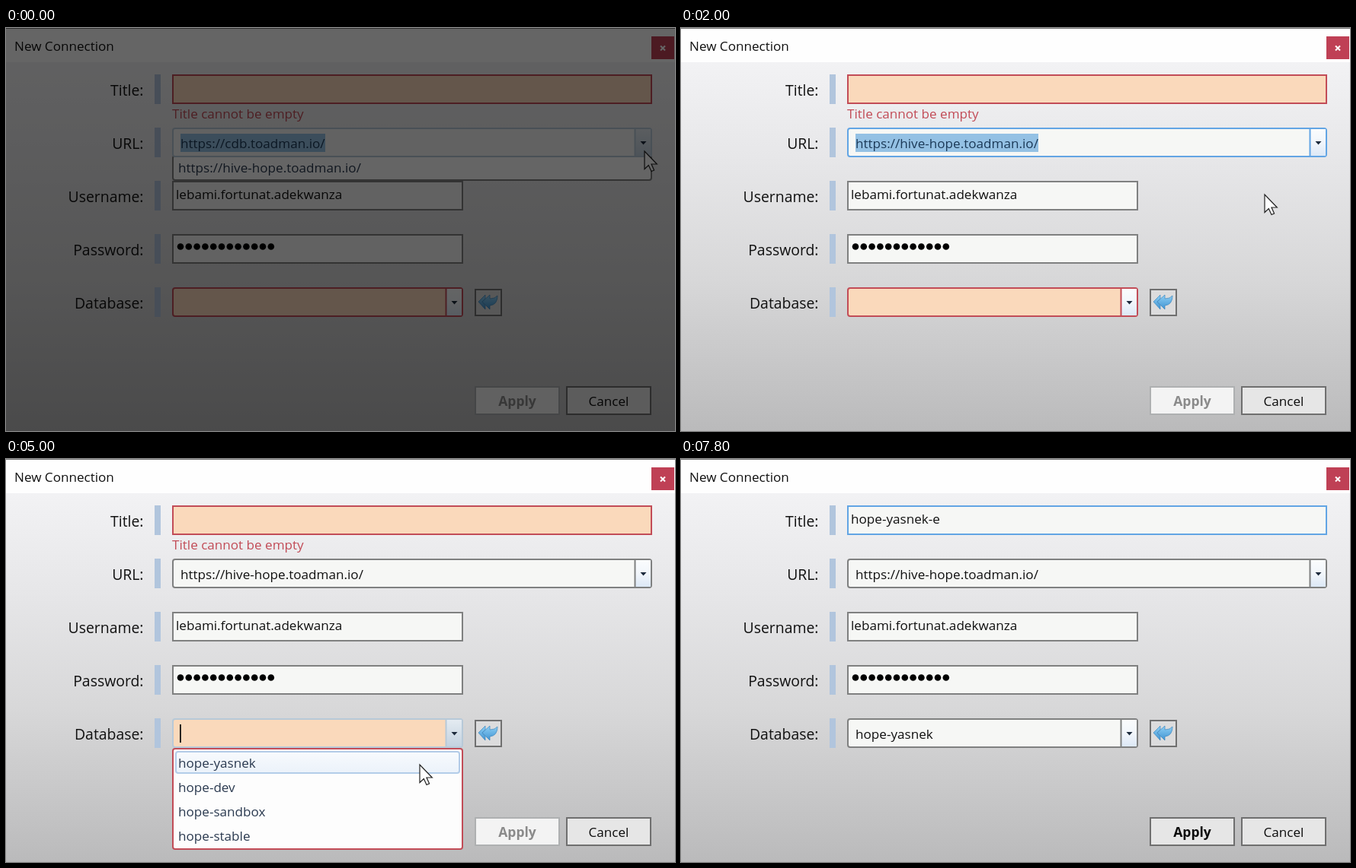
An HTML page that plays this animation: 878 px wide and 530 px high, repeating every 8000 ms.

```html
<!DOCTYPE html>
<html lang="en">
<head>
<meta charset="utf-8">
<title>New Connection</title>
<style>
html, body { margin: 0; width: 100%; height: 100%; overflow: hidden; }
svg { display: block; width: 878px; height: 530px; font: 17.1px "Open Sans", "Noto Sans", sans-serif; }
.label { font-size: 19.4px; text-anchor: end; }
.mid { text-anchor: middle; }
.bold { font-weight: 700; font-size: 17.5px; }
</style>
</head>
<body>
<svg viewBox="0 0 878 530">
  <defs>
    <linearGradient id="back" x2="0" y2="1">
      <stop stop-color="#f6f6f8"/><stop offset=".32" stop-color="#e7e7e9"/>
      <stop offset=".63" stop-color="#d7d7d8"/><stop offset="1" stop-color="#bababb"/>
    </linearGradient>
    <linearGradient id="drop" x2="0" y2="1">
      <stop stop-color="#fafcfd"/><stop offset=".5" stop-color="#f2f6fb"/><stop offset="1" stop-color="#dce8f6"/>
    </linearGradient>
    <linearGradient id="dropHot" x2="0" y2="1">
      <stop stop-color="#e4ebf1"/><stop offset="1" stop-color="#c3d2e0"/>
    </linearGradient>
    <linearGradient id="hover" x2="0" y2="1">
      <stop stop-color="#f8fafd"/><stop offset="1" stop-color="#ebf2fa"/>
    </linearGradient>
    <linearGradient id="arrow" x2="0" y2="1">
      <stop stop-color="#8fd0f5"/><stop offset="1" stop-color="#3f93d2"/>
    </linearGradient>
  </defs>
  <g id="stage"></g>
</svg>
<script>
const LOOP = 8000, STEP = 200;
const GRAY = "#7f8080", RED = "#c24c57", BLUE = "#62a5e4", PALE = "#b7c9d8";
const PAPER = "#f6f7f5", PEACH = "#fad9bb", NAVY = "#2b3a50";
const HOST = "https://hive-hope.toadman.io/", DB = "hope-yasnek";
const ITEMS = [DB, "hope-dev", "hope-sandbox", "hope-stable"];
const LABELS = ["Title:", "URL:", "Username:", "Password:", "Database:"];

// Pointer path: time, x, y
const PATH = [
  [200, 838, 162], [1000, 782, 184], [1400, 772, 188], [2000, 766, 219], [2400, 766, 219],
  [3200, 585, 363], [3600, 585, 363], [4600, 543, 402], [5200, 543, 402],
  [5800, 517, 118], [6200, 470, 82], [6800, 470, 82]
];

const rect = (x, y, w, h, fill, stroke = "none", rx = 0) =>
  `<rect x="${x}" y="${y}" width="${w}" height="${h}" rx="${rx}" fill="${fill}" stroke="${stroke}" stroke-width="2"/>`;
const text = (x, y, s, fill = "#111", cls = "") =>
  `<text x="${x}" y="${y}" fill="${fill}" class="${cls}">${s}</text>`;
const path = (d, fill, more = "") => `<path d="${d}" fill="${fill}" ${more}/>`;
const caret = (x, y) => rect(x, y, 1.8, 24, "#111");
const blink = (t, start) => Math.floor((t - start) / 530) % 2 === 0;

function pointer(t) {
  if (t <= PATH[0][0]) return PATH[0].slice(1);
  const i = PATH.findIndex(p => p[0] >= t);
  if (i < 0) return null;
  const [t0, x0, y0] = PATH[i - 1], [t1, x1, y1] = PATH[i];
  const u = (t - t0) / (t1 - t0), k = u * u * (3 - 2 * u);
  return [x0 + (x1 - x0) * k, y0 + (y1 - y0) * k];
}

function combo(y, w, { value, selected, border, fill = PAPER, hot }) {
  const x = 219, split = x + w - 21.5, mid = split + 11;
  let s = rect(x, y, w, 37, fill, border, 3);
  s += rect(split, y + 1, 20.5, 35, `url(#${hot ? "dropHot" : "drop"})`);
  s += path(`M${split} ${y}v37`, "none", `stroke="${border}" stroke-width="2"`);
  s += path(`M${mid - 4} ${y + 17}h8l-4 4.5z`, "#1c2a3c");
  if (selected) s += rect(229, y + 7, selected, 24, "#94c1e4");
  return s + text(229, y + 26, value, selected ? "#1c3a58" : "#111");
}

function button(x, label, on, cls) {
  return rect(x, 472, 110, 36, on ? "#e6e6e6" : "#f3f3f3", on ? "#6f6f6f" : "#aeb0b1") +
    text(x + 55, 497, label, on ? "#0c0c0c" : "#8a8a8a", "mid " + cls);
}

function frameParts() {
  let s = rect(0, 0, 878, 530, "url(#back)") + rect(0, 0, 878, 45, "#fefefe") + rect(0, 0, 878, 1, "#747474");
  s += text(11, 30, "New Connection") + rect(847, 11, 30, 30, "#bf4055");
  s += path("M859 23.5l6 6m0 -6l-6 6", "none", 'stroke="#fff" stroke-width="2"');
  LABELS.forEach((name, i) => {
    s += text(180.5, 89 + 70 * i, name, "#111", "label") + rect(195, 61 + 70 * i, 8, 39, "#b1c5dd");
  });
  s += rect(219, 202, 380, 37, PAPER, GRAY) + text(223, 225, "lebami.fortunat.adekwanza");
  s += rect(219, 272, 380, 37, PAPER, GRAY);
  for (let i = 0; i < 12; i++) s += `<circle cx="${229 + 10.8 * i}" cy="287.5" r="4.3"/>`;
  s += rect(616, 344, 34, 34, "#dcdcdd", "#707070");
  const edge = 'stroke="#3c86bd" stroke-width=".7" stroke-linejoin="round"';
  s += path("M620 360l9 -9v5l-4 4 4 5v5z", "url(#arrow)", edge);
  s += path("M625 360l10 -9v5q7 0 10 -4q0 12 -10 13v5z", "url(#arrow)", edge);
  return s;
}
const BASE = frameParts();

function titleField(t) {
  const focus = t >= 6200, valid = t >= 7200;
  const value = t < 5400 ? "" : DB + (t >= 7400 ? "-e" : valid ? "-" : "");
  let s = rect(219, 62, 628, 37, valid ? PAPER : PEACH, valid ? BLUE : RED) + text(223, 85, value);
  if (!valid) {
    s += text(218, 119, value ? "This title is already used for another connection" : "Title cannot be empty", RED);
  }
  const caretOn = valid ? t < 7800 : focus && blink(t, 6200);
  return s + (caretOn ? caret(t >= 7400 ? 341 : valid ? 331 : 325.5, 66) : "");
}

function urlField(t, tip) {
  const open = t < 1400, focus = t < 3400;
  const border = open ? PALE : focus ? BLUE : t === 5800 ? "#93a4b3" : GRAY;
  let s = "";
  if (open) {
    s += rect(219, 168, 628, 32, "#fdfdfd", GRAY, 3);
    if (tip[1] > 172) s += rect(223, 172, 620, 24, "url(#hover)", "#b3cde9", 3);
    s += text(226, 190, HOST, NAVY);
  }
  return s + combo(132, 628, {
    value: open ? "https://cdb.toadman.io/" : HOST,
    selected: focus ? (open ? 190 : 240) : 0, border, hot: open
  });
}

function dbField(t, tip) {
  const open = t >= 3400 && t < 5400, done = t >= 5400;
  const border = open ? PALE : !done ? RED : t < 6200 ? BLUE : GRAY;
  let s = "";
  if (open) {
    const full = t >= 3600;
    s += rect(219, 381, 380, full ? 132 : 3.5, "#fdfdfd", RED, full ? 3 : 1.7);
    if (full) {
      if (tip[1] > 384) s += rect(223, 385, 372, 28, "url(#hover)", "#b3cde9", 3);
      ITEMS.forEach((name, i) => s += text(226, 406 + 32 * i, name, NAVY));
    }
  }
  s += combo(342, 380, {
    value: done ? DB : "", selected: done && t < 6200 ? 102 : 0,
    border, fill: done ? PAPER : PEACH, hot: open
  });
  return s + (open && t >= 3600 && blink(t, 3600) ? caret(228, 349) : "");
}

function scene(t) {
  const tip = pointer(t);
  let s = BASE + titleField(t) + urlField(t, tip) + dbField(t, tip);
  s += button(616, "Apply", t >= 7200, "bold") + button(736, "Cancel", true, "");
  if (tip) {
    s += path("M0 0V23.5L5.3 18.5 9 26.5 12.6 25 9 17H16.3Z", "#fff",
      `stroke="#222" stroke-width="1.2" transform="translate(${tip})"`);
  }
  return s + (t < 200 ? '<rect width="878" height="530" opacity=".6"/>' : "");
}

const stage = document.getElementById("stage");
const begin = performance.now();
let last = -1;
function draw(now) {
  const t = Math.floor((Math.max(0, now - begin) % LOOP) / STEP) * STEP;
  if (t !== last) stage.innerHTML = scene(last = t);
  requestAnimationFrame(draw);
}
draw(begin);
</script>
</body>
</html>
```
